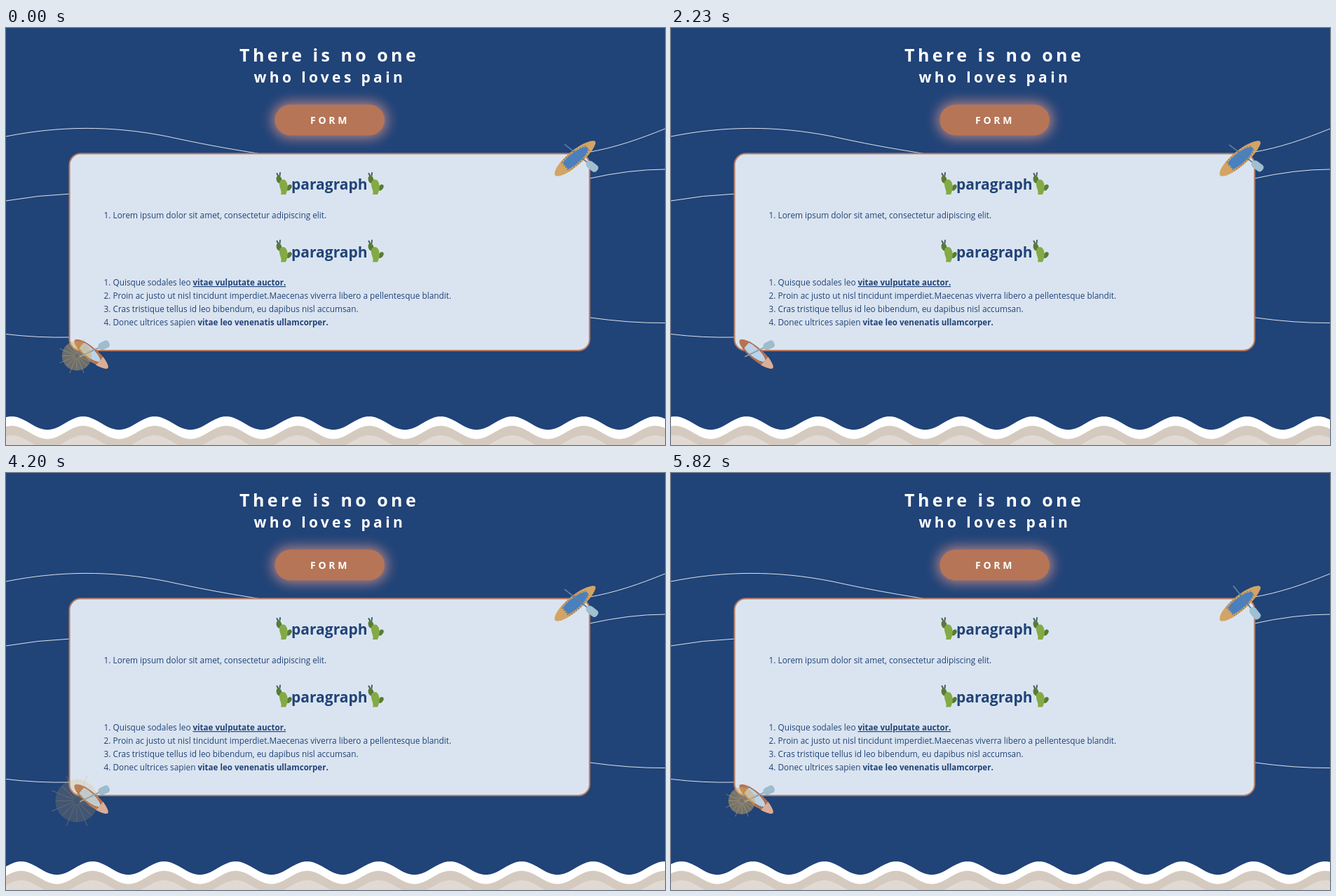
An HTML page that plays this animation: 940x596 px, repeating every 5.89 s.

```html
<!DOCTYPE html>
<html lang="en">
<head>
<meta charset="utf-8">
<title>Paragraphs on the water</title>
<style>
  html, body { margin: 0; width: 100%; height: 100%; overflow: hidden; background: #204378; }
  svg { display: block; }
  text { font-family: "Open Sans", "Noto Sans", sans-serif; fill: #204378; white-space: pre; }
  .b { font-weight: 700; }
  .w { font-weight: 700; fill: #fff; }
  .h { font-weight: 700; font-size: 21px; }
  .p { font-size: 11.83px; }
  .p .b { font-size: 11.57px; }
  .glow { filter: blur(9px); }
</style>
</head>
<body>
<svg width="940" height="596" viewBox="0 0 940 596">
  <defs>
    <g id="cactus">
      <path d="M4.5 6 2.5 2M6.5 5 7 1" stroke="#3f5f63" stroke-width="2" stroke-linecap="round"/>
      <ellipse cx="5.5" cy="10.5" rx="3.8" ry="5.6" fill="#587b35" transform="rotate(-15 5.5 10.5)"/>
      <ellipse cx="19.8" cy="22" rx="3.2" ry="4.8" fill="#587b35" transform="rotate(35 19.8 22)"/>
      <path d="M6 18C5 11 12 8 15.500 13 19 18 18 26 15 32H8C10 27 6.500 24 6 18Z" fill="#83aa44"/>
    </g>
    <path id="hull" d="M-37 1C-33-12 18-15 36-3 39-1 39 1 36 3 18 14-33 13-37 1Z"/>
    <path id="seat" d="M-17-6C-8-9 15-9 24-2V2C15 9-8 9-17 6Z"/>
    <path id="dots" d="M-17-8C-6-10 14-10 25-3M-17 8C-6 10 14 10 25 3M-18-7V7" fill="none" stroke-dasharray="1.5 2.500"/>
  </defs>

  <g fill="none" stroke="#fff" stroke-opacity=".85">
    <path d="M0 155C75 140 150 139 230 155 285 167 320 173 364 180M828 178C870 171 905 158 940 144"/>
    <path d="M0 247Q45 239 92 237M830 215.500Q890 202 940 202"/>
    <path d="M0 437.500Q45 443 92 442M830 413.500Q890 422 940 421.500"/>
  </g>

  <text class="w" x="333" y="48" font-size="25" letter-spacing="4.450">There is no one</text>
  <text class="w" x="353.500" y="78" font-size="21" letter-spacing="4.350">who loves pain</text>

  <rect class="glow" x="380" y="106" width="164" height="51" rx="25" fill="#c48a88" opacity=".9"/>
  <rect x="383.500" y="109.500" width="156.500" height="44" rx="22" fill="#b67556"/>
  <text class="w" x="434" y="137" font-size="14" letter-spacing="3.700">FORM</text>

  <rect x="90.500" y="179.500" width="742" height="281.500" rx="16" fill="#dae4f0" stroke="#b67a60" stroke-width="2"/>
  <use href="#cactus" x="384" y="206"/><use href="#cactus" x="515" y="206"/>
  <text class="h" x="407" y="231">paragraph</text>
  <use href="#cactus" x="384" y="302.500"/><use href="#cactus" x="515" y="302.500"/>
  <text class="h" x="407" y="327.500">paragraph</text>
  <g class="p">
    <text x="139.500" y="272">1.<tspan x="152.500">Lorem ipsum dolor sit amet, consectetur adipiscing elit.</tspan></text>
    <text x="139.500" y="368">1.<tspan x="152.500">Quisque sodales leo </tspan><tspan class="b" x="266.500" text-decoration="underline">vitae vulputate auctor.</tspan></text>
    <text x="139.500" y="387">2.<tspan x="152.500">Proin ac justo ut nisl tincidunt imperdiet.Maecenas viverra libero a pellentesque blandit.</tspan></text>
    <text x="139.500" y="406">3.<tspan x="152.500">Cras tristique tellus id leo bibendum, eu dapibus nisl accumsan.</tspan></text>
    <text x="139.500" y="424.500">4.<tspan x="152.500">Donec ultrices sapien </tspan><tspan class="b" x="273.500">vitae leo venenatis ullamcorper.</tspan></text>
  </g>

  <!-- right boat -->
  <g transform="translate(811 186.500) rotate(-39.600)">
    <use href="#hull" fill="#d3a464"/>
    <use href="#seat" fill="#4a80bd"/>
    <use href="#dots" stroke="#5d5f6c"/>
  </g>
  <g id="oar">
    <path d="M-31 0H10" stroke="#5f7f9f" stroke-width="1.800" stroke-linecap="round"/>
    <path d="M9-2Q12-6 16-5.500H24Q28-5 28 0T24 5.500H16Q12 6 9 2Z" fill="#a0bfd0"/>
  </g>

  <!-- left boat -->
  <g transform="translate(121.500 465.500) rotate(41) scale(.83)">
    <use href="#hull" fill="#b87350"/>
    <path d="M19-9.500Q30-7 36-3 39 0 36 3 30 7 19 9.500Z" fill="#d9ae98"/>
    <use href="#seat" fill="#bcd2e8" x="-5"/>
    <use href="#dots" stroke="#6d5a58" x="-5"/>
  </g>
  <g transform="translate(106 469.500) rotate(-25.500)">
    <path d="M0 0H30" stroke="#8a9db2" stroke-width="1.800" stroke-linecap="round"/>
    <path d="M29-2Q31-5.500 34-5.500H42Q45.500-5 45.500 0T42 5.500H34Q31 5.500 29 2Z" fill="#9dbccd"/>
  </g>

  <g id="ripple" stroke="#d4ac62" stroke-width="1.300">
    <circle r="38" fill="#d4ac62" fill-opacity=".55" stroke="none"/>
    <path id="rays"/>
  </g>

  <g id="sea"></g>
</svg>
<script>
const $ = id => document.getElementById(id);
const LOOP = 5890, WAVE = 102, TAU = 2 * Math.PI;

// Rays alternate between long and short.
let rays = '';
for (let i = 0; i < 16; i++) {
  const a = i * TAU / 16, r = i % 2 ? 48 : 37;
  rays += `M${6 * Math.cos(a)} ${6 * Math.sin(a)}L${r * Math.cos(a)} ${r * Math.sin(a)}`;
}
$('rays').setAttribute('d', rays);

function wavePath(mid) {
  let d = 'M-306 640';
  for (let x = -306; x <= 1326; x += 3)
    d += `L${x} ${(mid - 9.5 * Math.cos(TAU * x / WAVE)).toFixed(2)}`;
  return d + 'V640Z';
}
$('sea').innerHTML = [['#fff', 564.7], ['#d5cabf', 578], ['#e1dad4', 591.5]]
  .map(([fill, mid]) => `<path fill="${fill}" d="${wavePath(mid)}"/>`).join('');

function draw(t) {
  const crest = 53.5 - 167 * Math.cos(Math.PI * (t - 1650) / 4000);
  $('sea').setAttribute('transform', `translate(${crest % WAVE})`);

  const angle = 46.5 + 10 * Math.cos(TAU * (t - 1280) / 2100);
  $('oar').setAttribute('transform', `translate(821.5 186) rotate(${angle})`);

  const p = (t / 3100 + .22) % 1, e = p * p * (3 - 2 * p);
  $('ripple').setAttribute('transform', `translate(101 468.5) scale(${(18.7 + 19.5 * e) / 38})`);
  $('ripple').setAttribute('opacity', .87 * (1 - e));
}

const start = performance.now();
function frame() {
  draw((performance.now() - start) % LOOP);
  requestAnimationFrame(frame);
}
frame();
</script>
</body>
</html>
```
